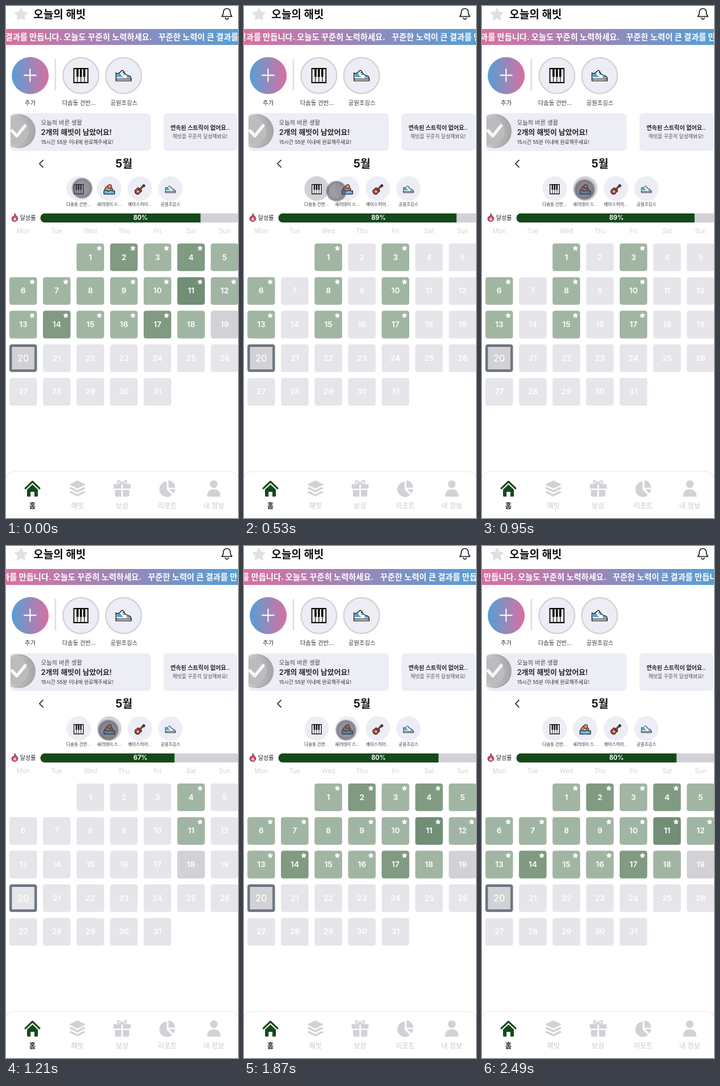
An HTML page for the animation above (2520 ms loop, 364x802 px).

```html
<!DOCTYPE html>
<html lang="ko">
<head>
<meta charset="utf-8">
<title>오늘의 해빗</title>
<style>
html, body { margin: 0; width: 100%; height: 100%; overflow: hidden; background: #fff; }
svg { display: block; width: 364px; height: 802px; font-family: Inter, "Noto Sans CJK KR", "Noto Sans CJK JP", sans-serif; }
</style>
</head>
<body>
<svg id="stage" viewBox="0 0 364 802">
  <defs>
    <linearGradient id="bar"><stop stop-color="#d9709f"/><stop offset="1" stop-color="#569fd5"/></linearGradient>
    <linearGradient id="add"><stop stop-color="#569fd5"/><stop offset="1" stop-color="#d9709f"/></linearGradient>
    <linearGradient id="coin"><stop stop-color="#d4d4d4"/><stop offset="1" stop-color="#a9a9ab"/></linearGradient>
    <radialGradient id="touch">
      <stop stop-color="#4a4450" stop-opacity=".5"/><stop offset=".66" stop-color="#4a4652" stop-opacity=".55"/>
      <stop offset=".8" stop-color="#55535f" stop-opacity=".72"/><stop offset=".92" stop-color="#6d6c78" stop-opacity=".55"/>
      <stop offset="1" stop-color="#6d6c78" stop-opacity="0"/>
    </radialGradient>
    <clipPath id="card"><rect x="7" y="168" width="220" height="59" rx="6"/></clipPath>
    <clipPath id="track"><rect x="54" y="324.7" width="314" height="14.6" rx="7.3"/></clipPath>
    <symbol id="piano" viewBox="0 0 24 24" overflow="visible">
      <path d="M1 1h22v22H1z" fill="#fff" stroke="#111" stroke-width="1.8"/>
      <path d="M6.5 14v9M12 14v9M17.5 14v9" stroke="#111" stroke-width="1.2"/>
      <path d="M5 1h3.4v13H5zM10.3 1h3.4v13h-3.4zM15.6 1H19v13h-3.4z" fill="#111"/>
    </symbol>
    <symbol id="shoe" viewBox="0 0 24 24" overflow="visible">
      <path d="M1 14.5V8q2 2 5 0l3-3q2-1 3 1 2 5 8 6.500 3 .8 3 4.500v2H1z" fill="#fff" stroke="#222" stroke-width="1.3" stroke-linejoin="round"/>
      <path d="M2 14V9q3 1 5-.5 2 5 6 6z M16 15l1-3 4 2v2z" fill="#45a5dc"/>
      <path d="M1 17h22v2.500H1z" fill="#fff" stroke="#222" stroke-width="1.200"/>
      <path d="m10.500 8.500 2.500-1.500m-1 4 2.500-2" stroke="#222"/>
    </symbol>
    <symbol id="swim" viewBox="0 0 24 24" overflow="visible">
      <path d="M1 16Q4 4 13 4l7 8v6z" fill="#e79a78" stroke="#222" stroke-width="1.500"/>
      <circle cx="13" cy="6" r="4.500" fill="#ed8a5d" stroke="#222" stroke-width="1.400"/>
      <path d="m5 16 4-6 6 1 4 5z" fill="#f3b798" stroke="#222"/>
      <path d="M0 15q3-3 6 0t6 0 6 0 6 0v8H0z" fill="#42a7dc" stroke="#222" stroke-width="1.400"/>
      <path d="M3 19q3-2 6 0t6 0 6 0" fill="none" stroke="#a9dcf5" stroke-width="1.500"/>
    </symbol>
    <symbol id="guitar" viewBox="0 0 24 24" overflow="visible">
      <path d="M9 9Q6 9 5 12q-5 1-4 6 2 6 8 5 3-1 3-4 4-1 4-5z" fill="#c6493f" stroke="#222" stroke-width="1.500"/>
      <path d="m9 16 10-11" stroke="#222" stroke-width="4"/>
      <path d="m9 16 10-11" stroke="#9b6240" stroke-width="1.500"/>
      <path d="m18 3 3-2 3 3-3 4z" fill="#333" stroke="#222"/>
      <circle cx="8" cy="17" r="2.200" fill="#f3d3a0"/>
    </symbol>
  </defs>
</svg>
<script>
const LOOP = 2520;
const GREEN = '#14491a', PALE = '#ededf6', GREY = '#d1d1d6', EMPTY = '#e5e5ea';
const SAGE = '#a1b5a3', MOSS = '#809b82', FERN = '#718f74';
const stage = document.getElementById('stage');

function add(tag, attrs, text) {
  const el = document.createElementNS('http://www.w3.org/2000/svg', tag);
  for (const k in attrs) el.setAttribute(k, attrs[k]);
  if (text !== undefined) el.textContent = text;
  return stage.appendChild(el);
}
const rect = (x, y, width, height, fill, rx = 0, more) => add('rect', { x, y, width, height, fill, rx, ...more });
const disc = (cx, cy, r, fill, more) => add('circle', { cx, cy, r, fill, ...more });
const path = (d, fill, more) => add('path', { d, fill, ...more });
const line = (d, stroke, width) =>
  path(d, 'none', { stroke, 'stroke-width': width, 'stroke-linecap': 'round', 'stroke-linejoin': 'round' });
const text = (s, x, y, size, fill = '#222', weight = 400, anchor = 'start') =>
  add('text', { x, y, fill, 'font-size': size, 'font-weight': weight, 'text-anchor': anchor }, s);
const mid = (s, x, y, size, fill, weight) => text(s, x, y, size, fill, weight, 'middle');
const icon = (id, cx, cy, size) =>
  add('use', { href: '#' + id, x: cx - size / 2, y: cy - size / 2, width: size, height: size });

function star(cx, cy, r, fill, round) {
  let d = '';
  for (let i = 0; i < 10; i++) {
    const a = i * Math.PI / 5, q = i % 2 ? r * .5 : r;
    d += (i ? 'L' : 'M') + (cx + q * Math.sin(a)).toFixed(2) + ' ' + (cy - q * Math.cos(a)).toFixed(2);
  }
  return path(d + 'Z', fill, { stroke: fill, 'stroke-width': round, 'stroke-linejoin': 'round' });
}

// Header
star(23.5, 13.5, 9.5, '#e0e0e2', 2);
text('오늘의 해빗', 43, 19, 17, '#111', 700);
line('M338.500 16.500q2.500-2.500 2.500-7a5.500 5.500 0 0 1 11 0q0 4.500 2.500 7zM344 19q2.500 3.500 5 0', '#222', 1.5);

// Ticker
rect(0, 36, 364, 25, 'url(#bar)');
const TIP = '꾸준한 노력이 큰 결과를 만듭니다. 오늘도 꾸준히 노력하세요.';
const ticker = [text(TIP, 229, 53, 12.7, '#fff', 700, 'end'), text(TIP, 239, 53, 12.7, '#fff', 700)];

// Shortcuts
disc(38, 109, 29, 'url(#add)');
line('M28.500 108.500h18.500M37.750 99v19', '#fff', 1.8);
rect(76.5, 83, 2, 49, '#d9d9df');
[['piano', 117.5, 24], ['shoe', 184.5, 26]].forEach(([id, x, size]) => {
  disc(x, 109, 28, PALE, { stroke: GREY, 'stroke-width': 2 });
  icon(id, x, 109, size);
});
mid('추가', 38, 155, 9.2, '#333');
mid('다솜동 건반...', 114.5, 155, 9.2, '#333');
mid('공원조깅스', 185, 155, 9.2, '#333');

// Cards
rect(7, 168, 220, 59, PALE, 6);
const clip = { 'clip-path': 'url(#card)' };
disc(20, 196, 26.5, '#a6a6a8', clip);
disc(17, 196, 26, 'url(#coin)', clip);
disc(15, 196, 20.5, '#bcbcbe', clip);
line('M9.500 195.500 17 203.500 30 187.500', '#f7f7f7', 5);
text('오늘의 바른 생활', 55, 186, 9.2, '#444');
text('2개의 해빗이 남았어요!', 55, 202, 11.4, '#222', 600);
text('15시간 55분 이내에 완료해주세요!', 55, 216, 7.9, '#333');
rect(247, 168, 116, 59, PALE, 6);
mid('연속된 스트릭이 없어요..', 304.5, 194, 9, '#222', 600);
mid('해빗을 꾸준히 달성해봐요!', 304.5, 207, 7.9, '#555');

// Month and filters
line('M58 241.500 52.500 247 58 252.500', '#222', 1.5);
mid('5월', 185, 253, 17.2, '#111', 700);
const filters = [['piano', '다솜동 건반...', 16], ['swim', '새러데이 스...', 17],
  ['guitar', '베이스히어...', 17], ['shoe', '공원조깅스', 17]].map(([id, label, size], i) => {
  const x = 114 + 48 * i, back = disc(x, 286, 19.2, PALE);
  icon(id, x, 287, size);
  mid(label, x, 312.5, 6.7, '#333');
  return back;
});

// Progress
path('M14 325q1 3 3 4.500 2.500 3 1 5.500-1.500 2.500-4.500 2.500-4 0-4.500-4 0-3 2-4l.5 1.500q2-3 2.500-6z', '#d64a63', { stroke: '#552631', 'stroke-width': .8 });
path('M14 331q2.500 2 2 4-2 2.500-4.500 0-.5-2 2.500-4z', '#f8c1cc');
text('달성률', 22, 335, 9, '#222');
const inTrack = { 'clip-path': 'url(#track)' };
rect(54, 324.7, 314, 14.6, GREY, 0, inTrack);
const fill = rect(54, 324.7, 0, 14.6, GREEN, 0, inTrack);
const percent = mid('', 211, 335.3, 9.7, '#fff', 700);

// Calendar
const STEP = 52.67;
['Mon', 'Tue', 'Wed', 'Thu', 'Fri', 'Sat', 'Sun'].forEach((d, i) => mid(d, 27 + STEP * i, 356, 10, '#d4d4d8'));
const days = Array.from({ length: 31 }, (_, i) => {
  const n = i + 1, x = 5.3 + STEP * ((n + 1) % 7), y = 372 + STEP * Math.floor((n + 1) / 7), today = n === 20;
  const cell = today
    ? rect(x + 2, y + 2, 39.3, 39.3, GREY, 2, { stroke: '#6b7580', 'stroke-width': 4 })
    : rect(x, y, 43.3, 43.3, EMPTY, 4);
  mid(n, x + 21.7, y + (today ? 27 : 25.8), today ? 14.5 : 12.3, '#fff', today ? 500 : 600);
  return { cell, mark: star(x + 35.8, y + 7.6, 3.8, '#fff', 1) };
});

// Tab bar
path('M-1 810V745q0-16 16-16H349q16 0 16 16v65z', '#fff', { stroke: '#efeff1', 'stroke-width': 1.5 });
const OFF = '#d1d1d6';
line('M30.500 755.500 41.500 745 52.500 755.500', GREEN, 3);
path('M33 757.500 41.500 749.500 50 757.500V767q0 1.500-1.500 1.500H44.500V761h-6v7.500H34.500q-1.500 0-1.500-1.500z', GREEN);
path('M112 743 125 749.500 112 756 99 749.500zM102 753.500l-3 2 13 6.500 13-6.500-3-2-10 5zM102 759.700l-3 2 13 6.500 13-6.500-3-2-10 5z', OFF);
path('M169 749h12v7h-12zM183.500 749h12v7h-12zM171 758h10v10.500h-8q-2 0-2-2zM183.500 758h10v8.500q0 2-2 2h-8z', OFF);
line('M182 748.500q-8 0-7-4 3-3 7 4 4-7 7-4 1 4-7 4', OFF, 2);
path('M252 745V757.500l8.500 8.500A12 12 0 1 1 252 745z', OFF);
path('M255 743a11.500 11.500 0 0 1 10.500 11.500H255zM256 757h9.500q-.5 4-3 6.500z', OFF);
disc(326, 749, 6, OFF);
path('M315.500 768.500q0-11.500 10.500-11.500t10.500 11.500z', OFF);
mid('홈', 41.5, 787, 10.8, '#222', 600);
['해빗', '보상', '리포트', '내 정보'].forEach((s, i) => mid(s, [112, 182, 253, 326][i], 787, 10.9, '#c9c9ce', 500));

const touch = disc(0, 0, 17, 'url(#touch)');

// Calendar views: shaded days, and those without a star
const views = {
  all: { rate: 80, plain: [5, 8, 18, 19, 20], shades: [
    [SAGE, [1, 3, 5, 6, 7, 8, 9, 10, 12, 13, 15, 16, 18]], [MOSS, [2, 4, 14, 17]], [FERN, [11]], [GREY, [19, 20]]] },
  piano: { rate: 89, plain: [20], shades: [[SAGE, [1, 3, 6, 8, 10, 13, 15, 17]], [GREY, [20]]] },
  swim: { rate: 67, plain: [18], shades: [[SAGE, [4, 11]], [GREY, [18]]] }
};
const viewAt = [[0, 'all'], [200, 'piano'], [1010, 'swim'], [1750, 'all']];
const pickAt = [[0, -1], [80, 0], [860, 1], [1570, -1]];
const touchPath = [[0, 119.5, 285.5, 1], [290, 120, 286, 1], [530, 145, 290, 1], [740, 161, 287.5, 1],
  [950, 161, 287.5, 1], [1210, 160.5, 288.3, 1], [2220, 160, 288.5, 1], [2340, 160, 288.5, 0], [LOOP, 160, 288.5, 0]];

const held = (table, t) => table.filter(row => row[0] <= t).pop()[1];

function between(table, t) {
  const i = table.findIndex(row => row[0] > t), a = table[i - 1], b = table[i];
  const k = (t - a[0]) / (b[0] - a[0]);
  return a.map((v, j) => v + (b[j] - v) * k);
}

let shown;
function show(name) {
  if (shown === name) return;
  shown = name;
  const { rate, plain, shades } = views[name];
  fill.setAttribute('width', 3.14 * rate);
  percent.textContent = rate + '%';
  days.forEach(({ cell, mark }, i) => {
    const shade = shades.find(([, list]) => list.includes(i + 1));
    cell.setAttribute('fill', shade ? shade[0] : EMPTY);
    mark.setAttribute('visibility', shade && !plain.includes(i + 1) ? 'visible' : 'hidden');
  });
}

function draw(now) {
  const t = now % LOOP, shift = -t * .01365;
  ticker.forEach(el => el.setAttribute('transform', `translate(${shift})`));
  show(held(viewAt, t));
  const pick = held(pickAt, t);
  filters.forEach((el, i) => el.setAttribute('fill', i === pick ? GREY : PALE));
  const [, x, y, alpha] = between(touchPath, t);
  touch.setAttribute('transform', `translate(${x} ${y})`);
  touch.setAttribute('opacity', alpha);
}

const start = performance.now();
function tick() {
  draw(performance.now() - start);
  requestAnimationFrame(tick);
}
draw(0);
requestAnimationFrame(tick);
</script>
</body>
</html>
```
